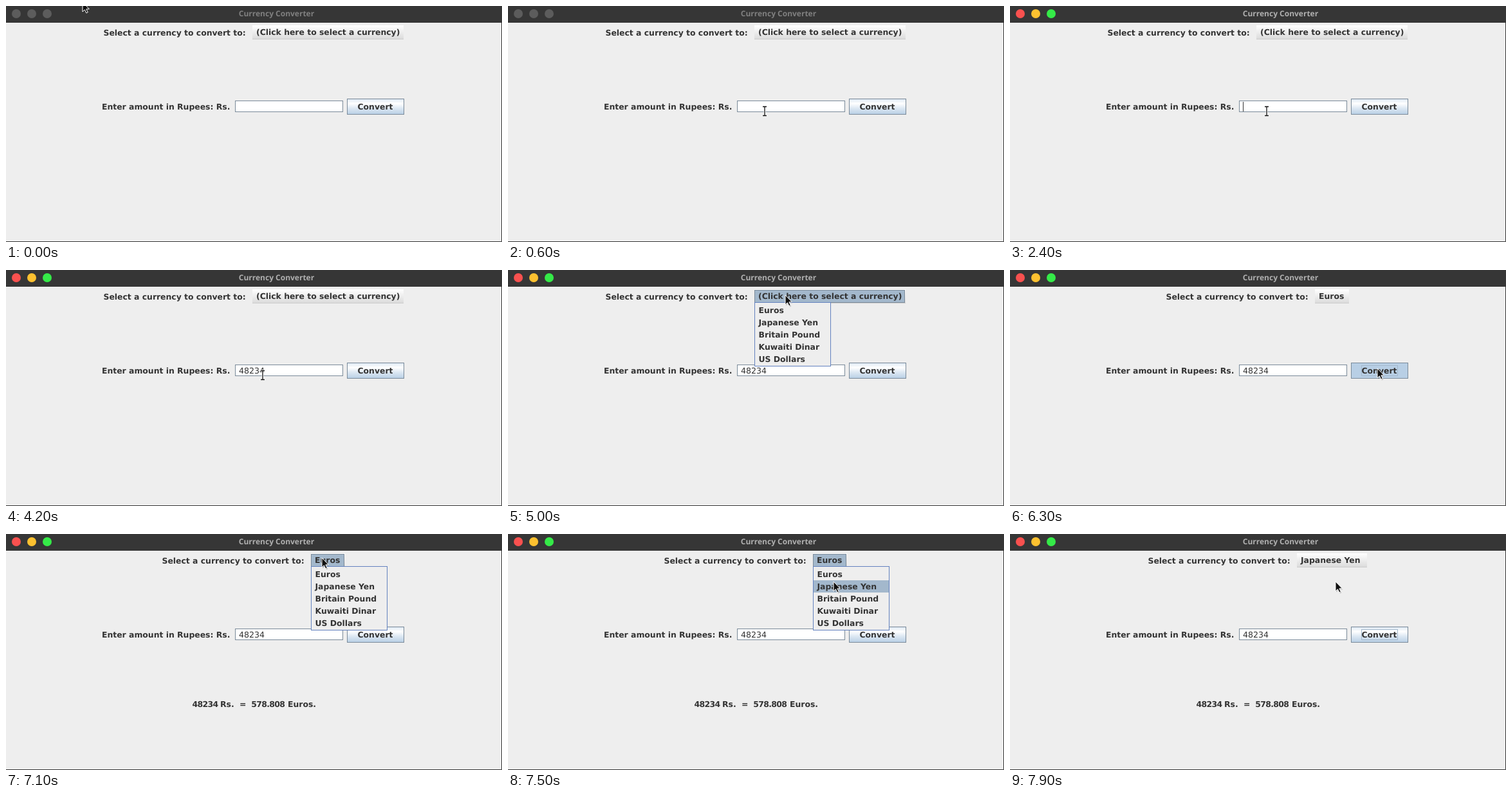
Recreate the animation shown at these times as an HTML page. Size 771 by 367 pixels, loop 8000 ms.

```html
<!DOCTYPE html>
<html lang="en">
<head>
<meta charset="utf-8">
<title>Currency Converter</title>
<style>
html, body { margin: 0; width: 100%; height: 100%; overflow: hidden; background: #eee; }
svg { display: block; width: 771px; height: 367px; }
text { font: bold 12.4px "DejaVu Sans", sans-serif; fill: #333; white-space: pre; text-rendering: geometricPrecision; }
#title { font: bold 12px "Noto Sans", sans-serif; text-anchor: middle; }
#amount { font-weight: normal; font-size: 12.57px; }
.num { letter-spacing: -.63px; }
</style>
</head>
<body>
<svg viewBox="0 0 771 367">
  <defs>
    <linearGradient id="steel" x2="0" y2="1">
      <stop stop-color="#dde8f3"/><stop offset=".3" stop-color="#fff"/>
      <stop offset=".6" stop-color="#dde8f3"/><stop offset="1" stop-color="#b8cfe5"/>
    </linearGradient>
    <linearGradient id="silver" x2="0" y2="1">
      <stop stop-color="#fff"/><stop offset="1" stop-color="#dadada"/>
    </linearGradient>
  </defs>
  <rect width="771" height="367" fill="#eee"/>
  <rect width="771" height="26" fill="#363636"/>
  <path d="M770.5 0V366.5H0" fill="none" stroke="#363636"/>
  <g id="lights"><circle cx="16" cy="12" r="7"/><circle cx="40" cy="12" r="7"/><circle cx="64" cy="12" r="7"/></g>
  <text id="title" x="420.5" y="16">Currency Converter</text>

  <text id="label" y="46">Select a currency to convert to:</text>
  <g id="bar">
    <rect id="barFill" y="30" height="22" fill="url(#silver)"/>
    <rect id="barLine" y="51" height="1" fill="#ccc"/>
    <rect id="barOn" x=".5" y="31.5" height="19" fill="#a3b8cc" stroke="#7a8a99"/>
    <text id="choice" x="6" y="45"></text>
  </g>

  <text x="149" y="161">Enter amount in Rupees: Rs.</text>
  <rect x="356.5" y="147.5" width="167" height="17" fill="#fff" stroke="#7a8a99"/>
  <text id="amount" x="362" y="161"></text>
  <rect id="caret" y="149" width="1" height="15" fill="#333"/>

  <rect id="button" x="530.5" y="144.5" width="88" height="24" stroke="#7a8a99"/>
  <rect id="hover" x="532" y="146" width="85" height="21" fill="none" stroke="#b8cfe5" stroke-width="2"/>
  <rect id="focus" x="546.5" y="148.5" width="56" height="16" fill="none" stroke="#a3b8cc"/>
  <text x="546.5" y="161">Convert</text>

  <g id="result">
    <text class="num" x="289.6" y="269">48234</text>
    <text x="333" y="269">Rs.</text>
    <text x="363" y="269">=</text>
    <text class="num" x="381.3" y="269">578.808</text>
    <text x="438" y="269">Euros.</text>
  </g>

  <g id="popup">
    <rect x=".5" y="50.5" width="118" height="99" fill="#eee" stroke="#6382bf"/>
    <rect id="row" x="1" width="117" height="19" fill="#a3b8cc"/>
    <g id="items"></g>
  </g>

  <g id="arrow">
    <path d="M1 2V16.5L4.4 13.4L7 18.5L9.3 17.4L7 12.4H11.5Z" fill="#000" opacity=".18"/>
    <path d="M0 0V15L3.4 11.8L5.9 17L8.3 15.9L5.9 10.8H10.4Z" fill="#111" stroke="#fff" stroke-width="1"/>
  </g>
  <g id="beam" fill="none">
    <path d="M-3.5-7H3.5M0-7V7M-3.5 7H3.5" stroke="#fff" stroke-width="3"/>
    <path d="M-3-7H3M0-7V7M-3 7H3" stroke="#111" stroke-width="1.3"/>
  </g>
</svg>
<script>
const LOOP = 8000, STEP = 100;
const PROMPT = "(Click here to select a currency)";
const CURRENCIES = ["Euros", "Japanese Yen", "Britain Pound", "Kuwaiti Dinar", "US Dollars"];
const KEYS = [2600, 2800, 3200, 3400, 3700];
const CARET = [[1300, 1900], [2400, 4200], [4600, 5000], [5700, 6200]];
const MENU = [[5000, 5700], [7100, 7900]];
const POINTER = [
  [0, 119, -6], [600, 399, 163.5], [4300, 399, 163.5], [4600, 437, 51], [4700, 437, 51],
  [4800, 431, 39], [5000, 431, 39], [5200, 455, 88], [5300, 455, 88], [5400, 456, 65],
  [5600, 456, 65], [6200, 571, 153], [6600, 571, 153], [6800, 491, 37], [7100, 491, 37],
  [7500, 506, 74], [LOOP, 506, 74]
];

const $ = id => document.getElementById(id);
const set = (id, name, value) => $(id).setAttribute(name, value);
const show = (id, on) => set(id, "visibility", on ? "visible" : "hidden");
const move = (id, x, y = 0) => set(id, "transform", `translate(${x} ${y})`);
const during = (spans, t) => spans.some(([a, b]) => t >= a && t < b);

$("items").innerHTML = CURRENCIES.map((name, i) =>
  `<text x="6.5" y="${67 + 19 * i}">${name}</text>`).join("");

function pointerAt(t) {
  const i = POINTER.findIndex(p => p[0] > t);
  const [t0, x0, y0] = POINTER[i - 1], [t1, x1, y1] = POINTER[i];
  const u = (t - t0) / (t1 - t0), e = u * u * (3 - 2 * u);
  return [x0 + (x1 - x0) * e, y0 + (y1 - y0) * e];
}

function drawWindow(t) {
  const active = t >= 1300;
  const colors = active ? ["#f9514f", "#fdc130", "#35ea48"] : ["#5c5c5c", "#5c5c5c", "#5c5c5c"];
  [...$("lights").children].forEach((c, i) => c.setAttribute("fill", colors[i]));
  $("title").style.fill = active ? "#b0b0b0" : "#808080";
}

function drawMenu(t, x, y) {
  const [left, width, name] = t < 5700 ? [383, 235, PROMPT]
    : t < 7900 ? [474, 53, CURRENCIES[0]] : [446, 109, CURRENCIES[1]];
  const open = during(MENU, t);
  const row = Math.floor((y - 53) / 19);
  set("label", "x", left - 231.5);
  move("bar", left);
  move("popup", left);
  set("barFill", "width", width);
  set("barLine", "width", width);
  set("barOn", "width", width - 2);
  $("choice").textContent = name;
  show("barOn", open);
  show("popup", open);
  show("row", open && row >= 0 && row < CURRENCIES.length);
  set("row", "y", 53 + 19 * row);
}

function drawForm(t, x, y) {
  const typed = KEYS.filter(k => t >= k).length;
  const pressed = t >= 6300 && t < 6500;
  const over = x > 530 && x < 619 && y > 144 && y < 169;
  $("amount").textContent = "48234".slice(0, typed);
  set("caret", "x", 362 + 8 * typed);
  show("caret", during(CARET, t));
  set("button", "fill", pressed ? "#b8cfe5" : "url(#steel)");
  show("hover", over && !pressed);
  show("focus", t >= 6300 && !during(MENU, t));
  show("result", t >= 6500);
}

function drawPointer(x, y) {
  const inField = x > 356 && x < 524 && y > 147 && y < 165;
  show("arrow", !inField);
  show("beam", inField);
  move("arrow", x, y);
  move("beam", x, y);
}

function render(time) {
  const t = Math.floor(time % LOOP / STEP) * STEP;
  const [x, y] = pointerAt(t);
  drawWindow(t);
  drawMenu(t, x, y);
  drawForm(t, x, y);
  drawPointer(x, y);
}

const start = performance.now();
function tick() {
  render(performance.now() - start);
  requestAnimationFrame(tick);
}
tick();
</script>
</body>
</html>
```
